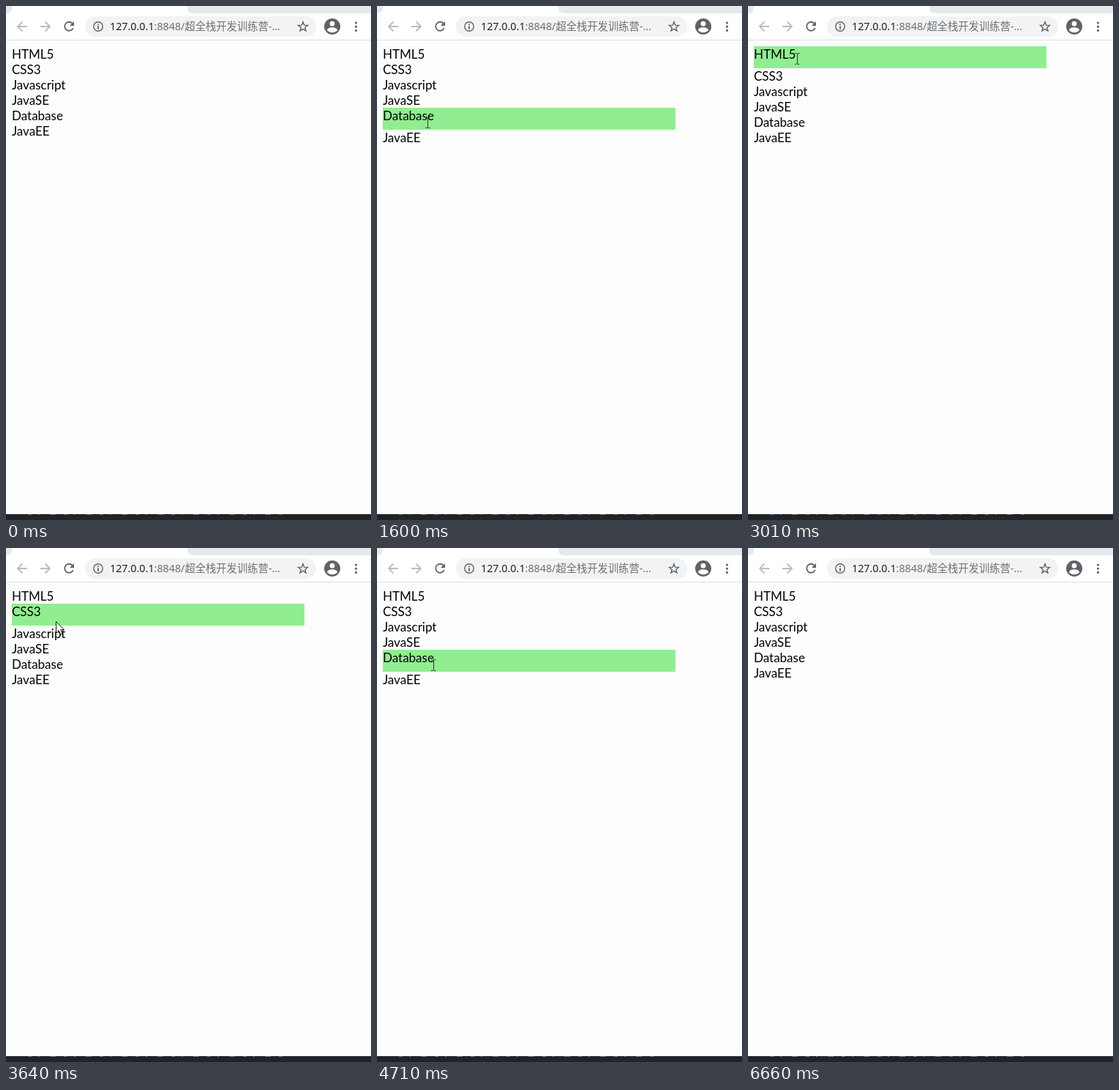
An HTML page for the animation above (7.2 s loop, 499 by 702 pixels).

```html
<!DOCTYPE html>
<html lang="zh">
<head>
<meta charset="utf-8">
<title>Hover list</title>
<style>
  html, body { margin: 0; width: 100%; height: 100%; overflow: hidden; background: #fdfdfd; }
  svg { display: block; }
  .list { font: 17px Lato, "Noto Sans", sans-serif; }
  .url { font: 14.3px "Noto Sans", "Noto Sans CJK SC", "Noto Sans CJK", sans-serif; fill: #6c7074; }
  .line { fill: none; stroke: #5f6368; stroke-width: 1.8; }
  .off { stroke: #babcbe; }
  .thin { stroke-width: 1.4; }
</style>
</head>
<body>
<svg width="499" height="702" viewBox="0 0 499 702">
  <!-- browser bar -->
  <rect width="499" height="46" fill="#fff"/>
  <path d="M0 0H8V2Q8 10 0 10ZM248 0H499V10H256Q248 10 248 2Z" fill="#e6e8eb"/>
  <path d="M0 46.5H499" stroke="#dcdee1"/>
  <path class="line off" d="M29 28H16M22.5 21.5L16 28L22.5 34.5M47 28H60M53.5 21.5L60 28L53.5 34.5"/>
  <path class="line" d="M90.6 23.6A6 6 0 1 0 91.8 30"/>
  <path d="M93 21V27H87Z" fill="#5f6368"/>
  <rect x="108" y="14" width="316" height="28" rx="14" fill="#f1f3f4"/>
  <circle class="line thin" cx="126" cy="28" r="6.2"/>
  <path class="line" d="M126 24.3V25.9M126 27.2V31.7"/>
  <text class="url" x="142" y="33"><tspan fill="#202124">127.0.0.1</tspan>:8848/超全栈开发训练营-...</text>
  <path class="line thin" id="star"/>
  <circle cx="446" cy="28" r="11" fill="#5f6368"/>
  <circle cx="446" cy="24.2" r="3.4" fill="#fff"/>
  <path d="M439 33.4C439 27.9 453 27.9 453 33.4Q446 39 439 33.4Z" fill="#fff"/>
  <path d="M478.5 23h0M478.5 28.2h0M478.5 33.4h0" stroke="#5f6368" stroke-width="3.2" stroke-linecap="round"/>

  <!-- page -->
  <rect id="hover" x="8" width="400" height="30" fill="#90ee90"/>
  <g class="list" id="list"></g>
  <rect y="694" width="499" height="8" fill="#222328"/>
  <path d="M30 694.5H380" stroke="#686a70" stroke-dasharray="5 9 2 14 8 11"/>

  <!-- pointers -->
  <path id="arrow" d="M.5 .5V16.3L4.2 12.8L6.8 18.5L9.2 17.5L6.7 11.7H11.5Z" fill="#fff" stroke="#111"/>
  <path id="beam" d="M-3 -7.5H-1L0 -6.5L1 -7.5H3.5M.5 -7V7M-3 7.5H-1L0 6.5L1 7.5H3.5" fill="none" stroke="#26402a"/>
</svg>
<script>
const LOOP = 7200, TICK = LOOP / 93;
const LEFT = 8, TOP = 55, LINE = 21, GROW = 9;
const SHOWN = 5, TURN = 42, HIDDEN = 86;
const $ = id => document.getElementById(id);

// Key points of the pointer's path: tick, x, y
const path = [
  [6, 408, 621], [16, 72, 205], [21, 69, 159], [29, 69, 117],
  [39, 67, 72], [42, 67, 70], [44, 67, 89], [54, 70, 126],
  [56, 71, 143], [61, 77, 160], [65, 78, 179], [66, 78, 179],
  [70, 79, 253], [74, 79, 253], [84, 436, 690], [85, 400, 687]
];

const rows = ['HTML5', 'CSS3', 'Javascript', 'JavaSE', 'Database', 'JavaEE'].map(name => {
  const row = document.createElementNS('http://www.w3.org/2000/svg', 'text');
  row.textContent = name;
  row.setAttribute('x', LEFT);
  return $('list').appendChild(row);
});

$('star').setAttribute('d', 'M' + Array.from({ length: 10 }, (_, i) => {
  const r = i % 2 ? 2.9 : 6.8, a = i * Math.PI / 5;
  return [406 + r * Math.sin(a), 28.5 - r * Math.cos(a)];
}).join('L') + 'Z');

function pointer(tick) {
  const next = path.findIndex(([at]) => at > tick);
  if (next < 1) return path.at(next).slice(1);
  const [t0, x0, y0] = path[next - 1], [t1, x1, y1] = path[next];
  const p = (tick - t0) / (t1 - t0);
  return [Math.round(x0 + (x1 - x0) * p), Math.round(y0 + (y1 - y0) * p)];
}

// The hovered row is taller, so its lower edge depends on the direction of travel.
function rowAt(tick, y) {
  const edge = tick < TURN ? TOP : TOP + GROW;
  const row = Math.max(0, Math.floor((y - edge) / LINE));
  return row < rows.length ? row : -1;
}

function show(id, on, x, y) {
  $(id).style.display = on ? '' : 'none';
  $(id).setAttribute('transform', `translate(${x} ${y})`);
}

function draw(t) {
  const tick = Math.floor(t / TICK + 0.4);
  const [x, y] = pointer(tick);
  const visible = tick >= SHOWN && tick < HIDDEN;
  const active = visible ? rowAt(tick, y) : -1;
  const hot = active >= 0;
  const top = TOP + active * LINE;
  const onText = hot && y <= top + LINE && x < LEFT + rows[active].getComputedTextLength() + 2;

  rows.forEach((row, i) =>
    row.setAttribute('y', TOP + 17 + i * LINE + (hot && i > active ? GROW : 0)));
  show('hover', hot, 0, top);
  show('arrow', visible && !onText, x, y);
  show('beam', visible && onText, x, y);
}

const begin = performance.now();
function play() {
  draw((performance.now() - begin) % LOOP);
  requestAnimationFrame(play);
}
play();
</script>
</body>
</html>
```
